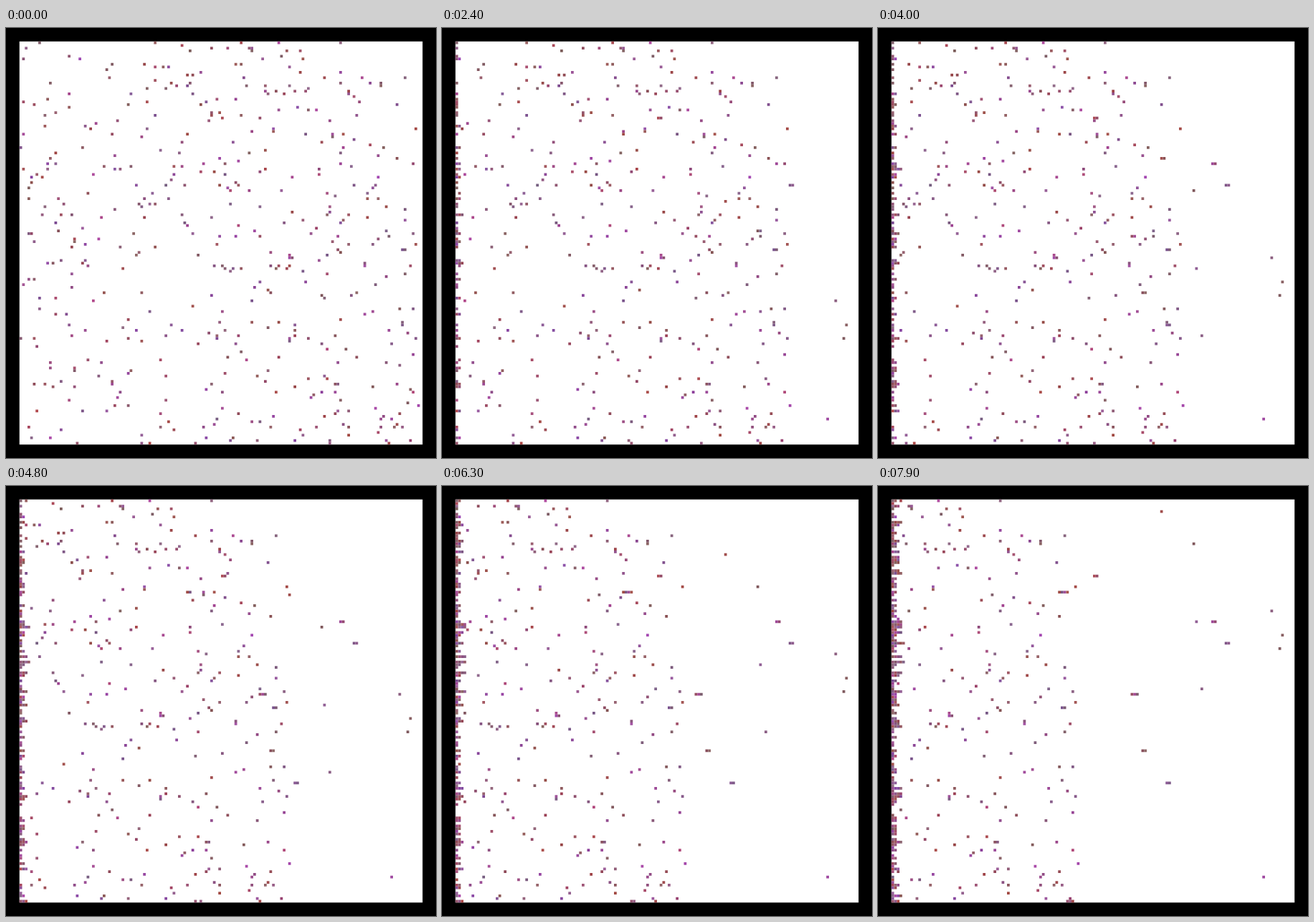
These frames come from a looping animation (600 px wide and 600 px high, 8 s). An HTML page with a canvas:

```html
<!DOCTYPE html>
<html lang="en">
<head>
<meta charset="utf-8">
<title>Migrating cells</title>
<style>
  html, body { margin: 0; width: 100%; height: 100%; overflow: hidden; background: #000; }
  canvas { display: block; }
</style>
</head>
<body>
<canvas id="stage" width="600" height="600"></canvas>
<script>
const SIZE = 150, CELL = 3.75, BORDER = 5;
const STEPS = 80, STEP_MS = 100, CROWD = 480;
const LEFT = [-1, 0], UP = [0, -1], STILL = [0, 0];

// The few cells that do not join the drift to the left wall.
const climbers = [[141, 120], [145, 129], [144, 134], [100, 83], [112, 94], [115, 148], [113, 124]];
const anchors = [[138, 140], [119, 45], [124, 53], [89, 72], [93, 93], [102, 105], [75, 28], [62, 34], [65, 149]];

let seed = 4177;
function random() {
  seed = (seed + 0x6D2B79F5) | 0;
  let t = Math.imul(seed ^ (seed >>> 15), seed | 1);
  t ^= t + Math.imul(t ^ (t >>> 7), t | 61);
  return ((t ^ (t >>> 14)) >>> 0) / 4294967296;
}
const between = (low, high) => low + random() * (high - low);
const pick = n => Math.floor(random() * n);

const cells = [], taken = new Set();
const key = (x, y) => y * SIZE + x;

function add(x, y, dir) {
  if (taken.has(key(x, y))) return;
  taken.add(key(x, y));
  const color = `hsl(${between(280, 365)}, ${between(14, 42)}%, ${between(42, 50)}%)`;
  cells.push({ x, y, dir, color });
}

for (const [x, y] of climbers) add(x, y, UP);
for (const [x, y] of anchors) add(x, y, STILL);
while (cells.length < CROWD) add(pick(SIZE - 1), pick(SIZE), LEFT);
cells.sort((a, b) => a.x - b.x);

// A cell advances unless a wall or another cell is in its way.
function advance(cell) {
  const x = cell.x + cell.dir[0], y = cell.y + cell.dir[1];
  if (x < 0 || y < 0 || taken.has(key(x, y))) return;
  taken.delete(key(cell.x, cell.y));
  taken.add(key(x, y));
  cell.x = x;
  cell.y = y;
}

const history = [];
for (let i = 0; i < STEPS; i++) {
  history.push(cells.map(({ x, y }) => [x, y]));
  cells.forEach(advance);
}

const ctx = document.getElementById("stage").getContext("2d");
ctx.scale(CELL, CELL);
ctx.translate(BORDER, BORDER);

function draw(step) {
  ctx.fillStyle = "#000";
  ctx.fillRect(-BORDER, -BORDER, SIZE + 2 * BORDER, SIZE + 2 * BORDER);
  ctx.fillStyle = "#fff";
  ctx.fillRect(0, 0, SIZE, SIZE);
  history[step].forEach(([x, y], i) => {
    ctx.fillStyle = cells[i].color;
    ctx.fillRect(x, y, 1, 1);
  });
}

const start = performance.now();
function tick() {
  const elapsed = performance.now() - start;
  draw(Math.floor(elapsed / STEP_MS) % STEPS);
  requestAnimationFrame(tick);
}
tick();
</script>
</body>
</html>
```
